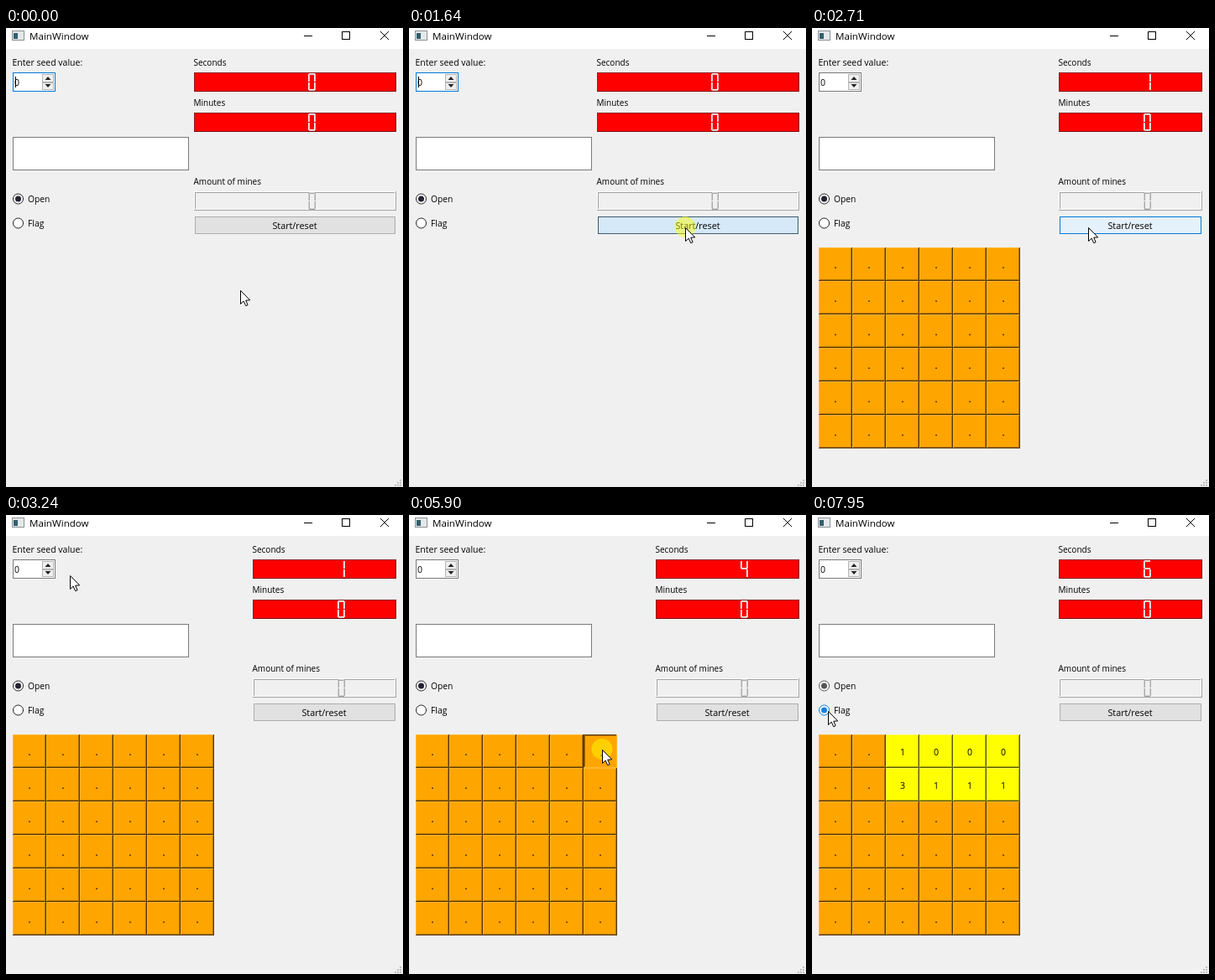
Animation, 473 px wide and 548 px high, one loop 8000 ms. Source, as an HTML page with a canvas:

```html
<!DOCTYPE html>
<html lang="en">
<head>
<meta charset="utf-8">
<title>MainWindow</title>
<style>
html, body { margin: 0; width: 100%; height: 100%; overflow: hidden; background: #f0f0f0; }
canvas { display: block; }
</style>
</head>
<body>
<canvas id="stage" width="473" height="548"></canvas>
<script>
const LOOP = 8000;
const STEP = 66.4;
const ctx = document.getElementById('stage').getContext('2d');

const CLICK_AT = 1570, GRID_AT = 1710, BLUR_AT = 1910;
const PRESS_AT = 5900, REVEAL_AT = 6030, RADIO_AT = 7884, FLAG_AT = 7950;
const REVEALED = ['1000', '3111'];
const BLUE = '#0078d7';

// Stops of the pointer and the curves between them.
const REST = [279, 313], BUTTON = [329, 238], SPIN = [49, 60], CELL = [230, 280], FLAG = [19, 234];
const MOVES = [
  { at: 440, steps: 12, from: REST, bend: [298, 279], to: BUTTON },
  { at: 2970, steps: 8, from: BUTTON, bend: [183, 117], to: SPIN },
  { at: 4170, steps: 12, from: SPIN, bend: [101, 247], to: CELL },
  { at: 7490, steps: 6, from: CELL, bend: [110, 252], to: FLAG }
];

// Segments lit per digit: a top, b/c right, d bottom, e/f left, g middle.
const DIGITS = ['abcdef', 'bc', 'abged', 'abgcd', 'fgbc', 'afgcd', 'afgedc'];

const between = (t, a, b) => t >= a && t < b;
const easeOut = u => 1 - (1 - u) ** 2.35;

function pointer(t) {
  const move = MOVES.filter(m => t >= m.at).pop();
  if (!move) return REST;
  const { at, steps, from, bend, to } = move;
  const s = easeOut(Math.min(1, (Math.floor((t - at) / STEP) + 1) / steps));
  return from.map((p, i) =>
    Math.round(p * (1 - s) ** 2 + 2 * bend[i] * s * (1 - s) + to[i] * s * s));
}

function rect(x, y, w, h, color) {
  ctx.fillStyle = color;
  ctx.fillRect(x, y, w, h);
}

function frame(x, y, w, h, fill, border) {
  rect(x, y, w, h, border);
  rect(x + 1, y + 1, w - 2, h - 2, fill);
}

function bevel(x, y, w, h, light, dark) {
  rect(x, y, w, 1, light);
  rect(x, y, 1, h, light);
  rect(x, y + h - 1, w, 1, dark);
  rect(x + w - 1, y, 1, h, dark);
}

function label(str, x, y, size = 10, align = 'left') {
  ctx.font = `${size}px "Open Sans", "Noto Sans", sans-serif`;
  ctx.textAlign = align;
  ctx.fillStyle = '#000';
  ctx.fillText(str, x, y);
}

function poly(points, fill) {
  ctx.beginPath();
  points.forEach(([x, y]) => ctx.lineTo(x, y));
  ctx.closePath();
  ctx.fillStyle = fill;
  ctx.fill();
}

function disc(x, y, r, fill, stroke) {
  ctx.beginPath();
  ctx.arc(x, y, r, 0, Math.PI * 2);
  ctx.fillStyle = fill;
  ctx.fill();
  if (stroke) {
    ctx.strokeStyle = stroke;
    ctx.stroke();
  }
}

function titleBar() {
  rect(0, 0, 473, 25, '#fff');
  frame(7, 3, 15, 12, '#e4e8ea', '#8a9196');
  rect(9, 6, 5, 7, '#33606f');
  label('MainWindow', 28, 14, 11.6);
  rect(355, 9, 10, 1, '#000');
  ctx.strokeStyle = '#000';
  ctx.strokeRect(400.5, 4.5, 9, 9);
  ctx.beginPath();
  ctx.moveTo(446, 4); ctx.lineTo(456, 14);
  ctx.moveTo(456, 4); ctx.lineTo(446, 14);
  ctx.stroke();
}

function arrow(x, y, dir) {
  poly([[x, y - 2 * dir], [x + 3.5, y + 2 * dir], [x - 3.5, y + 2 * dir]], '#222');
}

function spinBox(t) {
  const over = between(t, 3300, 4450);
  frame(8, 53, 51, 23, '#fff', t < BLUR_AT ? BLUE : over ? '#333' : '#7a7a7a');
  const hover = between(t, 3430, 4236);
  frame(43, 55, 14, 10, hover ? '#e5f1fb' : '#f0f0f0', hover ? BLUE : '#b4b4b4');
  frame(43, 65, 14, 9, '#f0f0f0', '#b4b4b4');
  arrow(50, 60, 1);
  arrow(50, 69, -1);
  label('0', 10, 69, 10.5);
  const caretOn = Math.floor((t + 490) / 530) % 2 === 0;
  if (t < GRID_AT && (t < 570 || caretOn && t > 1000)) rect(11, 58, 1, 13, '#000');
}

function radio(str, y, ring, dot, fill = '#fff') {
  disc(14.5, y, 6, fill, ring);
  if (dot) disc(14.5, y, 3.5, dot);
  label(str, 26, y + 4, 10.3);
}

function radios(t) {
  const flagged = t >= FLAG_AT, hover = t >= 7818;
  radio('Open', 204, flagged ? '#555' : '#222', flagged ? '#555' : '#222230');
  radio('Flag', 233, hover ? BLUE : '#222', flagged && '#1581d9',
    between(t, RADIO_AT, FLAG_AT) ? '#cce4f7' : '#fff');
}

function digit(n, x, y, light, dark) {
  for (const key of DIGITS[n]) {
    const i = 'agdfbec'.indexOf(key);
    if (i < 3) {
      const row = y + Math.floor(i * 9.5);
      rect(x + 1, row, 7, 1, light);
      rect(x + 1, row + 1, 7, 1, dark);
    } else {
      const col = x + (i - 3) % 2 * 7, top = y + 1 + Math.floor((i - 3) / 2) * 10;
      rect(col, top, 1, 9, light);
      rect(col + 1, top, 1, 9, dark);
    }
  }
}

function lcd(left, top, n, red) {
  const w = 465 - left, x = Math.floor((left + 465) / 2) + 16;
  rect(left, top, w, 23, red ? '#f00' : '#f0f0f0');
  if (red) {
    bevel(left, top, w, 23, '#8b2020', '#7f0000');
    digit(n, x, top + 1, '#f4ecec', '#dcc4c4');
  } else {
    bevel(left, top, w, 23, '#fff', '#a0a0a0');
    bevel(left + 1, top + 1, w - 2, 21, '#a0a0a0', '#fff');
    digit(n, x, top + 1, '#d0d0d0', '#a8a8a8');
  }
}

function buttonColors(t) {
  const [x, y] = pointer(t);
  if (between(t, CLICK_AT, GRID_AT)) return ['#d5e9f8', '#3c5a70'];
  const over = x > 225 && between(y, 225, 246);
  return over ? ['#e5f1fb', BLUE] : ['#e1e1e1', '#adadad'];
}

function rightColumn(t) {
  const left = t < GRID_AT ? 224 : 294;
  const seconds = Math.max(0, Math.floor((t - GRID_AT) / 996));
  label('Seconds', left - 0.5, 45);
  lcd(left, 53, seconds, true);
  label('Minutes', left - 0.5, 93);
  lcd(left, 101, 0, true);
  label('Amount of mines', left - 0.5, 187);
  lcd(left, 195, 0, false);
  frame(left + 1, 225, 463 - left, 21, ...buttonColors(t));
  label('Start/reset', (left + 465) / 2 - 0.5, 240, 10.8, 'center');
}

function cell(col, row, t) {
  const x = 8 + col * 40, y = 262 + row * 40;
  const open = t >= REVEAL_AT && row < 2 && col > 1;
  const down = col === 5 && row === 0 && between(t, PRESS_AT, REVEAL_AT);
  const [bg, light, mid, dark] = open
    ? ['#ff0', '#ffff50', '#aaaa00', '#5c5c00']
    : ['#ffa500', '#ffb733', '#aa6e00', '#5c3a00'];
  rect(x, y, 40, 40, bg);
  bevel(x, y, 40, 40, down ? dark : light, down ? light : dark);
  bevel(x + 1, y + 1, 38, 38, down ? mid : bg, down ? bg : mid);
  const shift = down ? 1 : 0;
  const [str, size] = open ? [REVEALED[row][col - 2], 10.5] : ['.', 13];
  label(str, x + 20 + shift, y + 25 + shift, size, 'center');
}

function grip() {
  for (let i = 0; i < 3; i++) {
    for (let j = 2 - i; j < 3; j++) rect(463 + j * 3, 539 + i * 3, 2, 2, '#bfbfbf');
  }
}

function cursor(x, y) {
  ctx.save();
  ctx.translate(x + 0.5, y + 0.5);
  poly([[0, 0], [0, 16], [3.7, 12.6], [6.2, 18.2], [8.6, 17.2], [6.2, 11.7], [11.2, 11.4]], '#fff');
  ctx.strokeStyle = '#000';
  ctx.stroke();
  ctx.restore();
}

function draw(t) {
  rect(0, 0, 473, 548, '#f0f0f0');
  titleBar();
  label('Enter seed value:', 7.5, 45, 10.5);
  spinBox(t);
  frame(8, 130, 210, 40, '#fff', '#7a7a7a');
  radios(t);
  rightColumn(t);
  if (t >= GRID_AT) {
    for (let i = 0; i < 36; i++) cell(i % 6, Math.floor(i / 6), t);
  }
  grip();
  const [x, y] = pointer(t);
  const clicking = [[CLICK_AT, GRID_AT], [PRESS_AT, REVEAL_AT], [RADIO_AT, FLAG_AT]]
    .some(([a, b]) => between(t, a, b));
  if (clicking) disc(x, y - 0.5, 12.5, 'rgba(255, 255, 0, 0.48)');
  cursor(x, y);
}

function tick() {
  draw(performance.now() % LOOP);
  requestAnimationFrame(tick);
}
tick();
</script>
</body>
</html>
```
